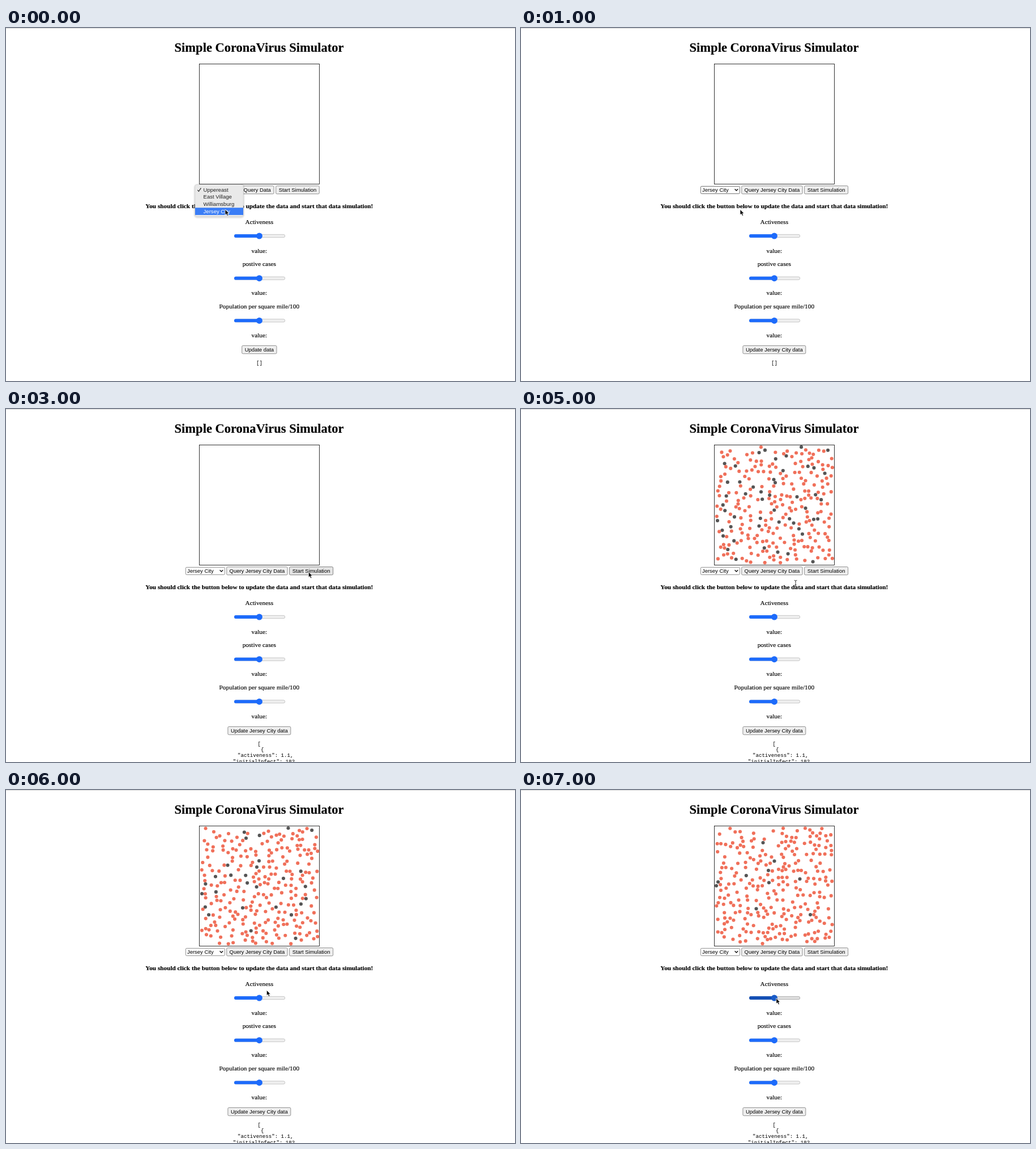
Animation of 899 by 623 pixels, one loop 8000 ms. Source, as an HTML page:

```html
<!DOCTYPE html>
<html lang="en">
<head>
<meta charset="utf-8">
<title>Simple CoronaVirus Simulator</title>
<style>
  html, body { margin: 0; width: 100%; height: 100%; overflow: hidden; background: #fff; }
  svg { display: block; width: 899px; height: 623px; }
  text { white-space: pre; }
  .serif { font: 11.3px "Liberation Serif", Times, serif; text-anchor: middle; stroke: #000; stroke-width: .15px; }
  .bold { font-weight: bold; }
  .sans { font: 9.45px "Liberation Sans", Arial, sans-serif; }
  .mono { font: 9.15px "Liberation Mono", Courier, monospace; }
  .mid { text-anchor: middle; }
</style>
</head>
<body>
<svg id="stage" viewBox="0 0 899 623" xmlns="http://www.w3.org/2000/svg"></svg>
<script>
const LOOP = 8000, STEP = 1000, FIRST = 4, MID = 447.3;
const BOX = { x0: 345, x1: 550.5, y0: 67, y1: 271.5 };
const stage = document.getElementById('stage');

function el(tag, attrs, parent = stage, text) {
  const node = document.createElementNS('http://www.w3.org/2000/svg', tag);
  for (const k in attrs) node.setAttribute(k, attrs[k]);
  if (text) node.textContent = text;
  parent.appendChild(node);
  return node;
}
const group = () => el('g', {});
const label = (cls, x, y, s, parent, extra) => el('text', { class: cls, x, y, ...extra }, parent, s);
const show = (node, on) => node.setAttribute('display', on ? 'inline' : 'none');

function button(parent, x0, x1, y, s) {
  const r = el('rect', { x: x0 + .4, y: y + .4, width: x1 - x0 - .8, height: 14.2, rx: 1.8, 'stroke-width': .8 }, parent);
  label('sans mid', (x0 + x1) / 2, y + 10.6, s, parent);
  paint(r, 0);
  return r;
}
// level 0 normal, 1 hovered, 2 pressed
function paint(r, level) {
  r.setAttribute('fill', ['#efefef', '#e5e5e5', '#dadada'][level]);
  r.setAttribute('stroke', ['#767676', '#666', '#4a4a4a'][level]);
}

function slider(y) {
  const track = el('rect', { x: 403.3, y: y - 2.6, width: 89.4, height: 5.2, rx: 2.6, 'stroke-width': .7 });
  const fill = el('path', { d: `M447 ${y - 2.9}H405.9a2.9 2.9 0 0 0 0 5.8H447z` });
  const thumb = el('circle', { cx: 447.4, cy: y, r: 5.5 });
  return on => {
    track.setAttribute('fill', on ? '#dedede' : '#efefef');
    track.setAttribute('stroke', on ? '#999' : '#b2b2b2');
    fill.setAttribute('fill', on ? '#1550b5' : '#1d6bfb');
    thumb.setAttribute('fill', on ? '#1a5cc8' : '#1d6bfb');
  };
}

// static page
el('rect', { width: 899, height: 623, fill: '#fff' });
el('rect', { width: 899, height: 1, fill: '#d9d9d9' });
label('serif bold', MID - .3, 42.1, 'Simple CoronaVirus Simulator', stage, { style: 'font-size:22.5px' });
el('rect', { x: 341.5, y: 63.5, width: 212, height: 212, fill: 'none', stroke: '#000', 'stroke-width': .8 });
label('serif bold', MID, 318.3, 'You should click the button below to update the data and start that data simulation!',
  stage, { style: 'font-size:11.25px' });
const sliders = ['Activeness', 'postive cases', 'Population per square mile/100'].map((s, i) => {
  const y = 367 + i * 74.7;
  label('serif', MID, y - 21.3, s);
  label('serif', MID, y + 29.6, 'value:');
  return slider(y);
});

// before the choice
const before = group();
button(before, 414, 473.5, 278.2, 'Query Data');
button(before, 476.3, 553.7, 278.2, 'Start Simulation');
button(before, 416.3, 478.4, 560.2, 'Update data');
const emptyJson = label('mono', 442, 593.6, '[]');

// after the choice
const after = group();
const select = el('rect', { x: 317.4, y: 279.4, width: 69, height: 13, rx: 1.8, fill: '#fff', 'stroke-width': .8 }, after);
label('sans', 320, 288.8, 'Jersey City', after);
el('path', { d: 'M377.6 284.2l2.8 2.8l2.8-2.8', fill: 'none', stroke: '#111', 'stroke-width': 1.4 }, after);
const query = button(after, 389.3, 497.5, 278.2, 'Query Jersey City Data');
const start = button(after, 500.2, 578, 278.2, 'Start Simulation');
button(after, 391.5, 503.2, 560.2, 'Update Jersey City data');

const json = group();
['[', '  {', '    "activeness": 1.1,', '    "initialInfect": 182,'].forEach((s, i) =>
  label('mono mid', MID, 593.6 + i * 10.4, s, json));

// opened list
const menu = group();
for (let i = 3; i > 0; i--)
  el('rect', { x: 334 - i, y: 277.5 - i, width: 85 + 2 * i, height: 56 + 2 * i, rx: 4 + i, opacity: .045 }, menu);
el('rect', { x: 333.8, y: 276.3, width: 85.4, height: 56.4, rx: 4, fill: '#e9e9e9', stroke: '#c6c6c6', 'stroke-width': .5 }, menu);
el('rect', { x: 334, y: 317.2, width: 85, height: 12.8, fill: '#3a7df6' }, menu);
el('path', { d: 'M338.4 285.8l2 2.6l4-6', fill: 'none', stroke: '#222', 'stroke-width': 1.1 }, menu);
['Uppereast', 'East Village', 'Williamsburg', 'Jersey City'].forEach((s, i) =>
  label('sans', 348.6, 288.7 + i * 12.65, s, menu, { fill: i === 3 ? '#fff' : '#222', style: 'font-size:9.55px' }));

// people who stay healthy to the end: x, y and the move per step
const KEPT = [
  [417, 69, 3.5, 8], [396, 149, .6, .7], [446, 124, .5, .5], [455, 124, -6, 6], [361, 173, -4.3, -3.6],
  [348, 211, -1, -14], [452, 186, -4.7, -7.5], [485, 154, 2.5, 1], [423, 205, -2.5, 1.5], [490, 221, 7, -.3]];
const TOTAL = 278, GAP = 5.8;
const healthy = k => [78, 50, 28, KEPT.length][k];

let seed = 2020;
function rand() {
  seed = (seed + 0x6D2B79F5) | 0;
  let t = Math.imul(seed ^ (seed >>> 15), 1 | seed);
  t = (t + Math.imul(t ^ (t >>> 7), 61 | t)) ^ t;
  return ((t ^ (t >>> 14)) >>> 0) / 4294967296;
}
const between = (a, b) => a + rand() * (b - a);
function bounce(v, lo, hi) {
  const w = hi - lo, m = (((v - lo) % (2 * w)) + 2 * w) % (2 * w);
  return lo + (m > w ? 2 * w - m : m);
}
const path = (x, y, vx, vy) => [0, 1, 2, 3].map(k =>
  [bounce(x + vx * k, BOX.x0, BOX.x1), bounce(y + vy * k, BOX.y0, BOX.y1)]);

const people = KEPT.map(p => path(...p));
const isFree = p => people.every(q => p.every(([x, y], k) => Math.hypot(x - q[k][0], y - q[k][1]) > GAP));
// some stand close to a neighbour, the others anywhere
function candidate() {
  let x = between(BOX.x0, BOX.x1), y = between(BOX.y0, BOX.y1);
  if (people.length > healthy(0) && rand() < .4) {
    const near = people[Math.floor(rand() * people.length)][0], a = rand() * 2 * Math.PI, d = between(6, 8);
    x = near[0] + d * Math.cos(a);
    y = near[1] + d * Math.sin(a);
  }
  const dir = rand() * 2 * Math.PI, v = between(3, 11);
  return path(x, y, v * Math.cos(dir), v * Math.sin(dir));
}
while (people.length < TOTAL) {
  let p, tries = 0;
  do p = candidate(); while (!isFree(p) && ++tries < 500);
  people.push(p);
}
const crowd = group();
const dots = people.map(() => el('circle', { r: 3.05 }, crowd));

// pointers
const arrow = el('path', { d: 'M0 0V9.6L2.2 7.6L3.8 11.2L5.6 10.4L4.1 7H7z', fill: '#000', stroke: '#fff', 'stroke-width': .8 });
const beam = el('path', { d: 'M482.6 302.4q2.4 0 2.4 1.6q0-1.6 2.4-1.6M485 304v8.6M482.6 314.2q2.4 0 2.4-1.6q0 1.6 2.4 1.6M483.6 310.5h2.8',
  fill: 'none', stroke: '#222', 'stroke-width': .9 });
const onList = [387, 320.3], onQuery = [443, 286.5], onStart = [534.3, 287.6];
const POINTER = [onList, onList, onQuery, onStart, onStart, null, [460.3, 353.2], [450.8, 367.6]];

let last = -1;
function draw(ms) {
  const step = Math.floor((ms % LOOP) / STEP);
  if (step === last) return;
  last = step;
  show(menu, step === 0);
  show(before, step === 0);
  show(after, step > 0);
  show(emptyJson, step < 2);
  show(json, step >= 2);
  select.setAttribute('stroke', step === 1 ? '#4f4f4f' : '#767676');
  paint(query, step === 2 ? 2 : 0);
  paint(start, step === 3 ? 1 : step === 4 ? 2 : 0);
  sliders.forEach((set, i) => set(i === 0 && step === 7));

  const k = step - FIRST;
  show(crowd, k >= 0);
  if (k >= 0) dots.forEach((d, i) => {
    const [x, y] = people[i][k];
    d.setAttribute('cx', x.toFixed(2));
    d.setAttribute('cy', y.toFixed(2));
    d.setAttribute('fill', i < healthy(k) ? '#555' : '#f0705a');
  });

  const p = POINTER[step];
  show(arrow, p);
  show(beam, !p);
  if (p) arrow.setAttribute('transform', `translate(${p})`);
}

const begin = performance.now();
function tick() {
  draw(performance.now() - begin);
  requestAnimationFrame(tick);
}
draw(0);
requestAnimationFrame(tick);
</script>
</body>
</html>
```
